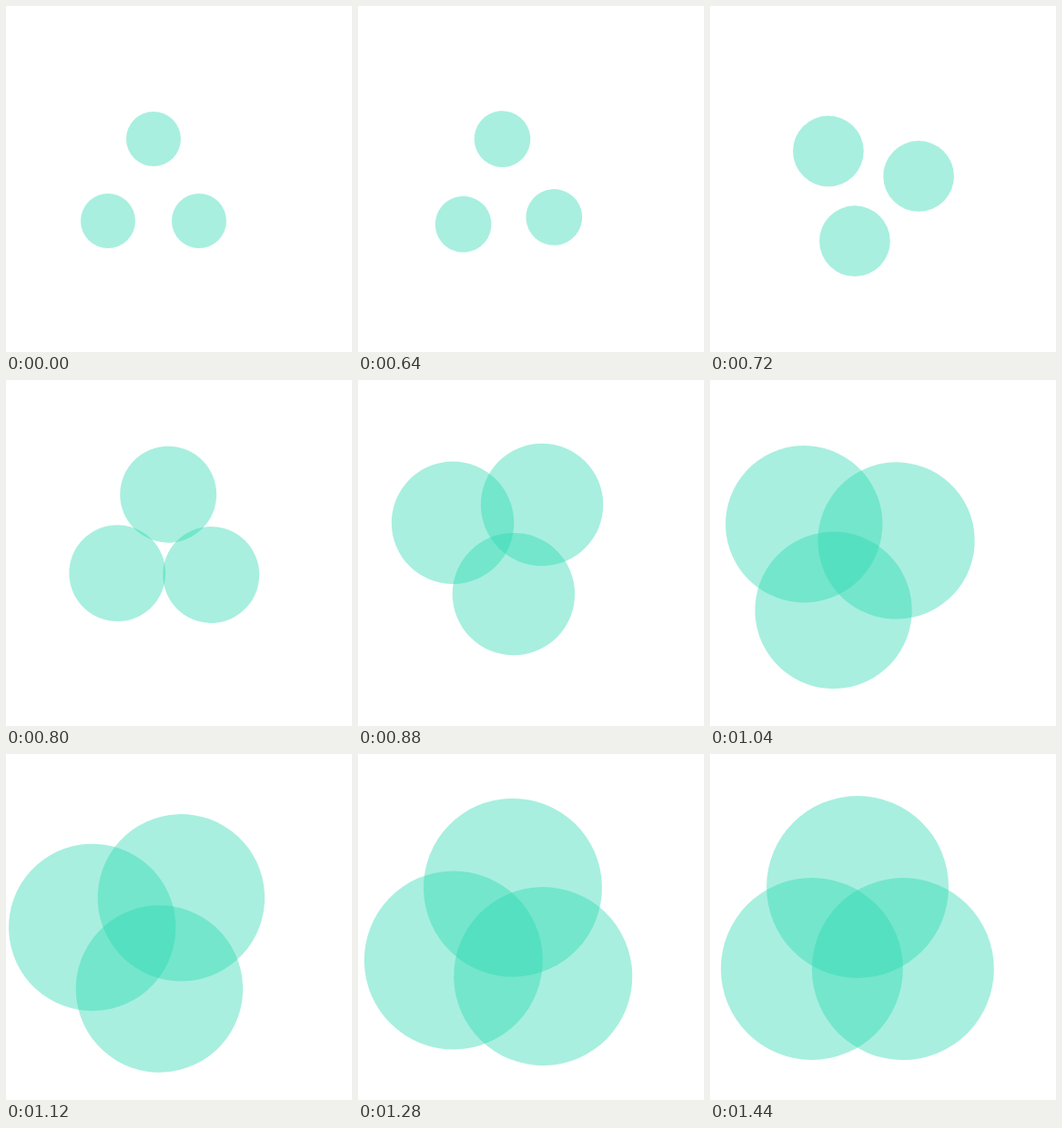
Recreate the animation shown at these times as an HTML page. Size 380x380 px, loop 1.84 s.

```html
<!DOCTYPE html>
<html lang="en">
<head>
<meta charset="utf-8">
<title>Spinning circles</title>
<style>
  html, body { margin: 0; width: 100%; height: 100%; overflow: hidden; background: #fff; }
  svg { display: block; width: 100%; height: 100%; }
  circle { fill: #26d7ae; fill-opacity: .4; }
</style>
</head>
<body>
<svg viewBox="0 0 380 380">
  <g id="trio">
    <circle cx="162" cy="146" r="30"/>
    <circle cx="112" cy="236" r="30"/>
    <circle cx="212" cy="236" r="30"/>
  </g>
</svg>
<script>
const LOOP = 1840, STEP = 20, START = 620, LENGTH = 840;
const trio = document.getElementById('trio');
const circles = trio.querySelectorAll('circle');

const bezier = (s, a, b) => 3 * s * (1 - s) ** 2 * a + 3 * s * s * (1 - s) * b + s ** 3;

// cubic-bezier(.25, .1, .25, 1), solved by bisection
function ease(x) {
  if (x <= 0) return 0;
  if (x >= 1) return 1;
  let lo = 0, hi = 1;
  for (let i = 0; i < 30; i++) {
    const mid = (lo + hi) / 2;
    if (bezier(mid, .25, .25) < x) lo = mid; else hi = mid;
  }
  return bezier(lo, .1, 1);
}

function draw(ms) {
  const t = Math.floor((ms % LOOP) / STEP) * STEP;
  const k = ease((t - START) / LENGTH);
  trio.setAttribute('transform', `rotate(${-360 * k} 162 191)`);
  circles.forEach(c => c.setAttribute('r', 30 + 70 * k));
}

let origin;
function tick(now) {
  origin ??= now;
  draw(Math.max(0, now - origin));
  requestAnimationFrame(tick);
}
draw(0);
requestAnimationFrame(tick);
</script>
</body>
</html>
```
